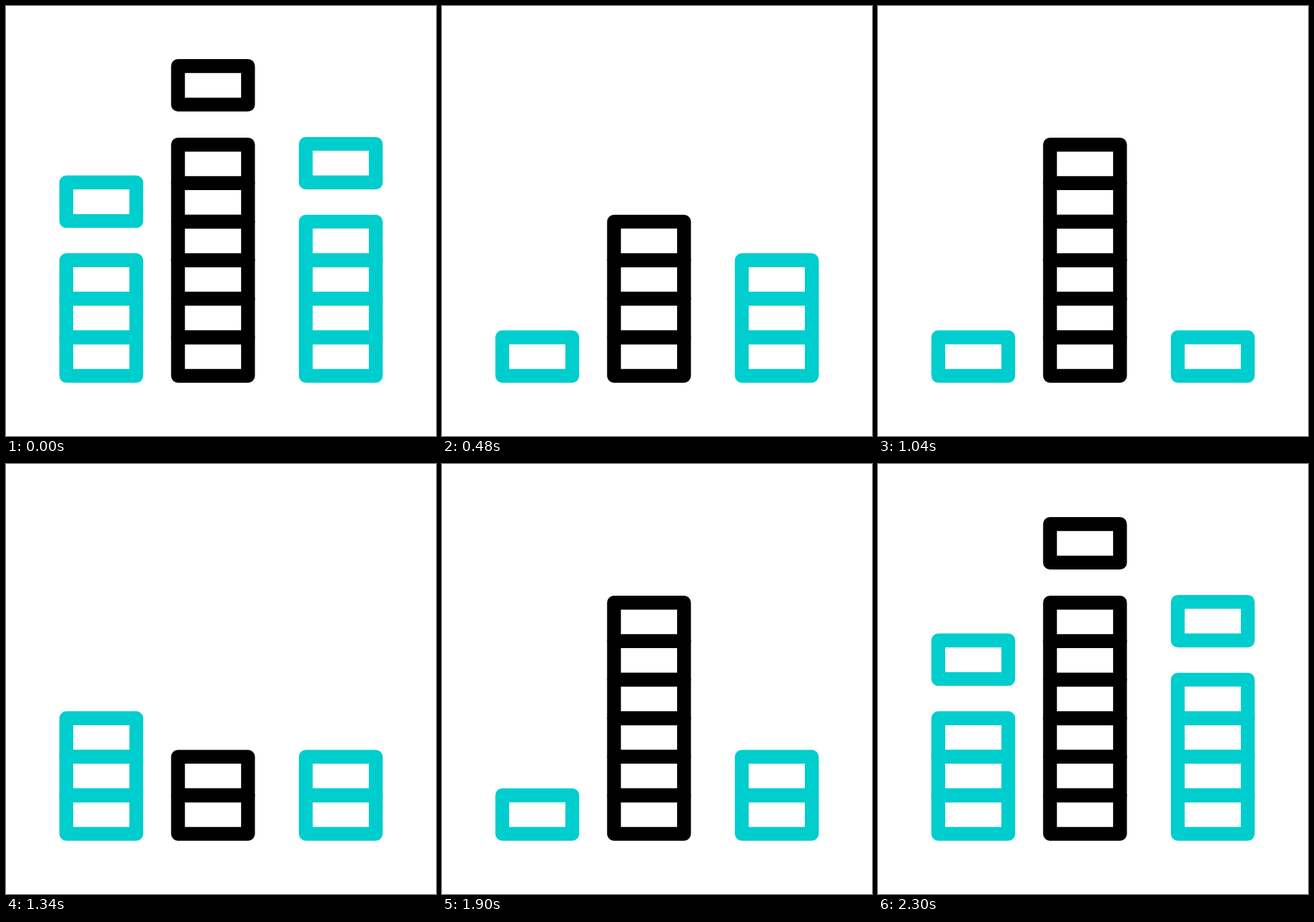
Recreate the animation shown at these times as an HTML page. Size 640x640 px, loop 2400 ms.

```html
<!DOCTYPE html>
<html lang="en">
<head>
<meta charset="utf-8">
<title>Equalizer</title>
<style>
  html, body { margin: 0; width: 100%; height: 100%; overflow: hidden; background: #fff; }
  svg { display: block; width: 100%; height: 100%; }
  rect { fill: none; stroke-width: 20.6; stroke-linejoin: round; }
</style>
</head>
<body>
<svg id="stage" viewBox="0 0 640 640"></svg>
<script>
const LOOP = 2400;
const TEAL = '#00cdcd';
const BLOCK = { width: 104.2, height: 57.36 };
const FLOOR = 550.5;

// keys: [time in ms, visible blocks]; blocks come and go at even steps between keys.
// The topmost block floats at capY above the stack.
const columns = [
  { x: 89.7, color: TEAL, stacked: 3, capY: 262.6, keys: [
    [0, 4], [480, 1], [640, 1], [780, 4], [1040, 1],
    [1140, 1], [1300, 3], [1640, 3], [1860, 1], [1980, 1], [2240, 4]] },
  { x: 256, color: '#000', stacked: 6, capY: 89.4, keys: [
    [-40, 7], [520, 3], [760, 6], [1130, 6], [1340, 2],
    [1480, 3], [1580, 3], [1900, 6], [2300, 7]] },
  { x: 446.2, color: TEAL, stacked: 4, capY: 205.3, keys: [
    [0, 5], [420, 3], [800, 3], [1000, 1], [1240, 2],
    [1480, 3], [1800, 2], [1960, 2], [2260, 5]] }
];

const stage = document.getElementById('stage');

function addBlock(x, y, color) {
  const rect = document.createElementNS(stage.namespaceURI, 'rect');
  const attrs = { x, y, ...BLOCK, stroke: color };
  for (const name in attrs) rect.setAttribute(name, attrs[name]);
  return stage.appendChild(rect);
}

for (const column of columns) {
  const { x, color, stacked, capY } = column;
  column.blocks = Array.from({ length: stacked + 1 }, (_, i) =>
    addBlock(x, i < stacked ? FLOOR - BLOCK.height * (i + 1) : capY, color));
}

function levelAt(keys, time) {
  const next = keys.findIndex(([start]) => start > time);
  if (next < 0) return keys[keys.length - 1][1];
  const [t0, from] = keys[next - 1];
  const [t1, to] = keys[next];
  return from + Math.trunc((to - from) * (time - t0) / (t1 - t0));
}

function draw(time) {
  for (const { blocks, keys } of columns) {
    const level = levelAt(keys, time);
    blocks.forEach((block, i) => {
      block.style.visibility = i < level ? 'visible' : 'hidden';
    });
  }
}

const begin = performance.now();
function tick() {
  draw((performance.now() - begin) % LOOP);
  requestAnimationFrame(tick);
}
tick();
</script>
</body>
</html>
```
